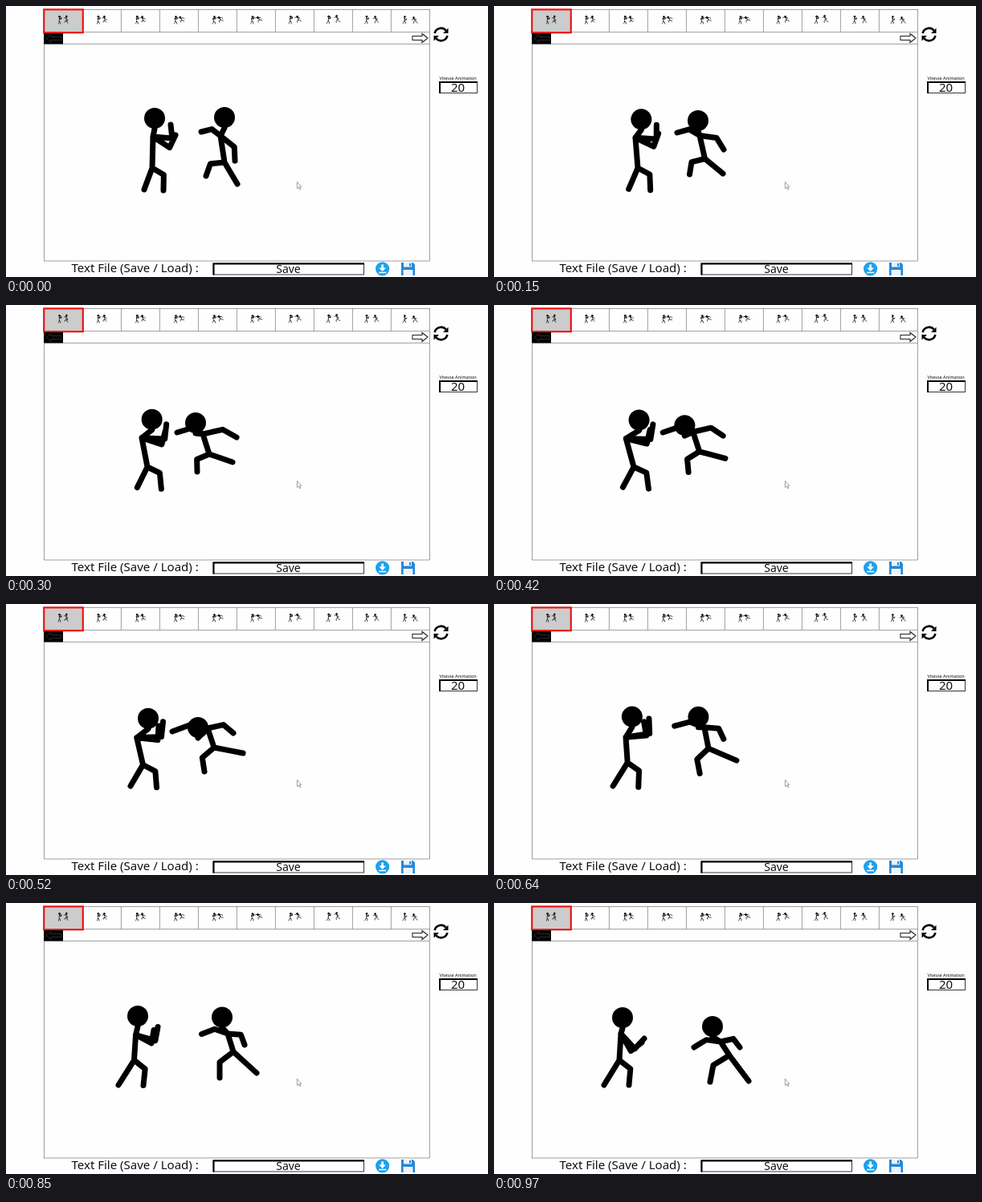
Recreate the animation shown at these times as an HTML page. Size 600x338 px, loop 1 s.

```html
<!DOCTYPE html>
<html lang="en">
<head>
<meta charset="utf-8">
<title>Stick fight editor</title>
<style>
  html, body { margin: 0; width: 100%; height: 100%; overflow: hidden; background: #fefefe; }
  svg { display: block; width: 100vw; height: 100vh; }
  text { font-family: "Noto Sans", sans-serif; fill: #111; }
  .line { fill: none; stroke: #888; stroke-width: .8; }
  .limbs { fill: none; stroke: #000; stroke-width: 7; stroke-linecap: round; stroke-linejoin: round; }
</style>
</head>
<body>
<svg viewBox="0 0 600 338">
  <rect class="line" x="47.4" y="4.4" width="480" height="313.6"/>
  <path class="line" d="M47 32.6H527.4M47 47.4H527.4"/>
  <g id="cells"></g>
  <rect x="47" y="34" width="24" height="13.4"/>
  <path d="M50 40.5l6-5v3h13v4H56v3z" fill="none" stroke="#2b2b2b"/>
  <path d="M525 40l-7-5.5v3H506v5h12v3z" fill="#fff" stroke="#222" stroke-width="1.1"/>

  <path d="M533.6 34A8 8 0 0 1 547.5 30.5M549.4 37A8 8 0 0 1 535.5 40.5" fill="none" stroke="#000" stroke-width="2.6"/>
  <path d="M550.5 27.5v6.5h-6.5zM532.5 43.5V37h6.5z"/>

  <text x="562.6" y="91.6" font-size="5.5" text-anchor="middle">Vitesse Animation</text>
  <rect x="539.5" y="94.5" width="47" height="14" fill="#fff" stroke="#222" stroke-width=".9"/>
  <path d="M540 109V95H587" fill="none" stroke="#000" stroke-width="2"/>
  <text x="562.5" y="106.8" font-size="15" text-anchor="middle">20</text>

  <text x="81.5" y="332" font-size="15">Text File (Save / Load) :</text>
  <rect x="258" y="321" width="187.5" height="14" fill="#fff" stroke="#222" stroke-width=".9"/>
  <path d="M258.5 335.4V321.4H446" fill="none" stroke="#000" stroke-width="2"/>
  <text x="351.5" y="332.8" font-size="14" text-anchor="middle">Save</text>

  <circle cx="468.6" cy="327.8" r="8.6" fill="#1da1ec"/>
  <path d="M467.2 322.5h2.8v4h3l-4.4 4.4-4.4-4.4h3zM464 331.8h9.2v1.4H464z" fill="#fff"/>
  <path d="M492 320h14.5l2.5 2.5V336H492z" fill="#2488d8"/>
  <path d="M495 320h10v5.6H495zM494.6 329h11.8v7H494.6z" fill="#eef3f8"/>
  <path d="M502 321h2v3.6h-2z" fill="#2488d8"/>

  <g id="stage"></g>
  <path d="M362.4 219.4v8.2l1.9-1.7 1.4 2.9 1.3-.6-1.4-2.8h2z" fill="#fff" stroke="#777" stroke-width=".7"/>
</svg>
<script>
const $ = id => document.getElementById(id);

// Key poses by time: head, neck, hip, two hands, two feet.
// Bends: share of the way along the limb and sideways offset of its middle joint.
const left = {
  arms: [[.7, 15], [.7, 15]],
  legs: [[.42, 0], [.45, -9]],
  poses: {
    0:   [[185, 140], [183, 163], [182, 202], [211, 161], [205, 148], [172, 229], [196, 230]],
    450: [[180, 144], [162, 167], [173, 202], [192, 155], [197, 149], [159, 227], [192, 229]],
    730: [[168, 139], [165, 166], [163, 196], [184, 143], [191, 140], [143, 227], [174, 228]],
    970: [[160, 143], [158, 163], [156, 196], [184, 174], [187, 169], [137, 227], [168, 227]]
  }
};
const right = {
  arms: [[.5, 6], [.57, -8]],
  legs: [[.53, 9], [.48, 0]],
  poses: {
    0:   [[272, 139], [267, 162], [272, 195], [243, 157], [285, 193], [249, 212], [288, 222]],
    300: [[236, 147], [245, 161], [253, 186], [213, 159], [287, 165], [238, 208], [282, 196]],
    520: [[239, 154], [251, 155], [259, 179], [207, 159], [283, 161], [247, 209], [295, 186]],
    730: [[266, 131], [270, 153], [273, 181], [238, 147], [288, 174], [263, 213], [307, 202]],
    970: [[272, 154], [282, 173], [293, 190], [249, 180], [306, 180], [269, 223], [317, 222]]
  }
};

const mix = (a, b, k) => a.map((v, i) => v + (b[i] - v) * k);

function poseAt(poses, t) {
  const times = Object.keys(poses).map(Number);
  const i = times.findIndex((time, n) => n > 0 && t <= time);
  const [from, to] = [times[i - 1], times[i]];
  return poses[from].map((p, n) => mix(p, poses[to][n], (t - from) / (to - from)));
}

const chain = (...points) => 'M' + points.join('L');

function limb(start, end, [share, bend]) {
  const [x, y] = mix(start, end, share);
  const dx = end[0] - start[0], dy = end[1] - start[1];
  const k = bend / Math.hypot(dx, dy);
  return chain(start, [x - dy * k, y + dx * k], end);
}

function figure({ arms, legs, poses }, t) {
  const [head, neck, hip, ...ends] = poseAt(poses, t);
  const [x, y] = head;
  const limbs = chain([x, y + 13], neck, hip) +
    arms.map((bend, i) => limb(neck, ends[i], bend)).join('') +
    legs.map((bend, i) => limb(hip, ends[i + 2], bend)).join('');
  return `<path class="limbs" d="${limbs}"/><circle cx="${x}" cy="${y}" r="13"/>`;
}

const fight = t => figure(left, t) + figure(right, t);

// Thumbnail strip: ten moments of the fight, each centred in its cell
function cell(i) {
  const t = i * 970 / 9, x = 47.4 + 48 * i;
  const middle = (poseAt(left.poses, t)[2][0] + poseAt(right.poses, t)[2][0]) / 2;
  return (i > 1 ? `<path class="line" d="M${x} 4V32.6"/>` : '') +
    `<g transform="translate(${x + 23.4 - middle / 10} -.8) scale(.1)">${fight(t)}</g>`;
}
$('cells').innerHTML =
  '<rect x="47.2" y="4.4" width="48.6" height="28.8" fill="#ccc" stroke="#f01414" stroke-width="2.2"/>' +
  Array.from({ length: 10 }, (_, i) => cell(i)).join('');

function draw(now) {
  const t = now % 1000;
  const lag = t < 340 ? 0 : 10;
  $('stage').innerHTML = fight(Math.floor((t - lag) / 30) * 30 + lag);
  requestAnimationFrame(draw);
}
draw(0);
</script>
</body>
</html>
```
